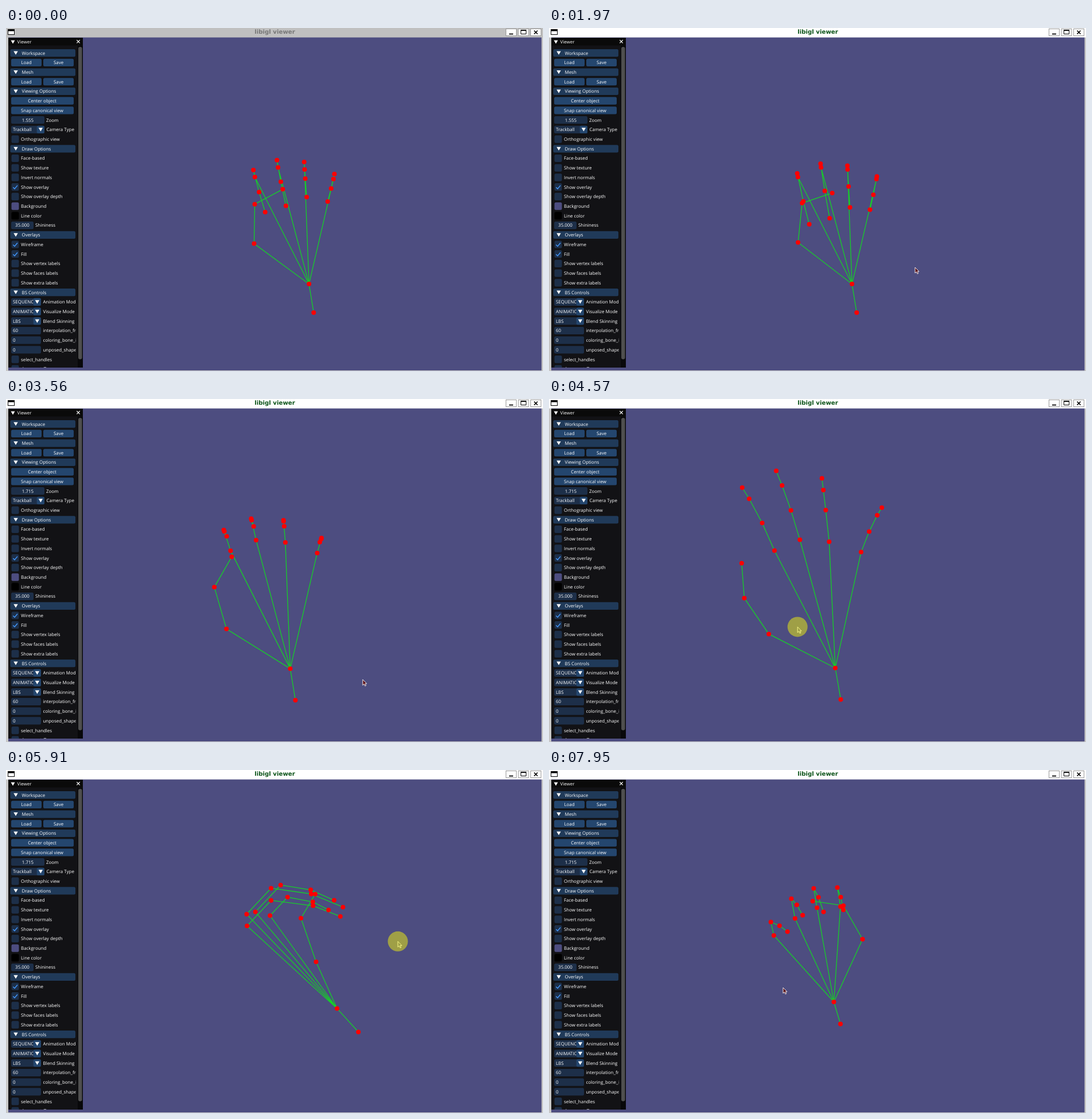
These frames come from a looping animation (936 px wide and 599 px high, 8000 ms). An HTML page:

```html
<!DOCTYPE html>
<html lang="en">
<head>
<meta charset="utf-8">
<title>Hand skeleton viewer</title>
<style>
html, body { margin: 0; width: 100%; height: 100%; overflow: hidden; background: #4d4d80; }
svg { display: block; width: 936px; height: 599px; }
text { font: 7.95px "Open Sans", "Noto Sans", sans-serif; fill: #fff; white-space: pre; text-rendering: geometricPrecision; }
#title { font: bold 10.2px "DejaVu Sans", sans-serif; }
.head { fill: #203a59; } .button { fill: #24466e; } .field { fill: #1d2f49; }
#bones { fill: none; stroke: #16cf28; stroke-width: 1.3; }
#joints { fill: #f00; }
</style>
</head>
<body>
<svg viewBox="0 0 936 599">
  <defs>
    <clipPath id="panelClip"><rect x="4" y="17" width="117.5" height="576"/></clipPath>
    <clipPath id="comboClip"><rect x="9" y="17" width="38.5" height="576"/></clipPath>
  </defs>
  <rect width="936" height="599" fill="#4d4d80"/>
  <path id="bones"/>
  <g id="joints"></g>
  <path d="M0 16H4V598H933.5V16H936V599H0Z" fill="#c8c8c8"/>
  <rect id="bar" width="936" height="16.5"/>
  <text id="title" x="468.5" y="10.3" text-anchor="middle">libigl viewer</text>
  <g stroke="#000" fill="#fff">
    <rect x="3.5" y="2.5" width="11" height="9"/><path d="M3 4H15" stroke-width="3"/>
    <g stroke="#999">
      <rect x="871.5" y="1.5" width="18" height="12"/><rect x="893" y="1.5" width="18" height="12"/><rect x="914.5" y="1.5" width="18" height="12"/>
    </g>
    <path d="M877 10.5H884" stroke-width="1.8"/>
    <path d="M897.5 4H906.5V10.5H897.5Z"/><path d="M897 4H907" stroke-width="1.8"/>
    <path d="M920.5 4.5L926.5 10.5M926.5 4.5L920.5 10.5" stroke-width="1.7"/>
  </g>
  <rect x="4" y="17" width="130" height="576" fill="#121215"/>
  <rect x="4" y="17" width="130" height="13.5" fill="#0a0a0a"/>
  <path d="M8.5 21.5H15.5L12 27.5Z" fill="#fff"/>
  <text x="19.5" y="26.7">Viewer</text>
  <path d="M123.3 21L128.7 26.4M128.7 21L123.3 26.4" stroke="#fff" stroke-width="1.1"/>
  <rect x="125" y="31" width="9" height="562" fill="#08080a"/>
  <rect x="126" y="33" width="6.5" height="545.5" rx="3" fill="#4f4f4f"/>
  <g id="panel" clip-path="url(#panelClip)"></g>
  <path id="arrow" d="M0 0V10L2.4 7.8L4 11.3L5.7 10.6L4.2 7.2H7Z" stroke="#fff" stroke-width=".9"/>
  <circle id="press" r="17.5" fill="#ff0" fill-opacity=".46"/>
</svg>
<script>
const $ = id => document.getElementById(id);
const set = (el, attrs) => { for (const k in attrs) el.setAttribute(k, attrs[k]); return el; };
const add = (parent, tag, attrs, content = '') => {
  const el = set(document.createElementNS('http://www.w3.org/2000/svg', tag), attrs);
  el.textContent = content;
  return parent.appendChild(el);
};

// Side panel: one entry per row
const panel = $('panel');
const box = (cls, x0, x1, y, extra) =>
  add(panel, 'rect', { class: cls, x: x0, y: y - 6.6, width: x1 - x0, height: 13.2, rx: 2.5, ...extra });
const label = (s, x, y, attrs) => add(panel, 'text', { x, y: y + 2.9, ...attrs }, s);
const centred = (s, x, y) => label(s, x, y, { 'text-anchor': 'middle' });
const triangle = (x, y) => add(panel, 'path', { d: `M${x - 3.7} ${y - 3}h7.4l-3.7 6.2z`, fill: '#fff' });
const widgets = {
  head(y, s) { box('head', 7.5, 121, y); triangle(17, y); label(s, 27.5, y); },
  pair(y) { [[9, 62, 'Load'], [65, 118, 'Save']].forEach(([a, b, s]) => { box('button', a, b, y); centred(s, (a + b) / 2, y); }); },
  wide(y, s) { box('button', 9, 118, y); centred(s, 63, y); },
  value(y, s, v, right) { box('field', 9, right, y); label(s, right + 3, y); return centred(v, (9 + right) / 2, y); },
  combo(y, s, v, right) {
    box('field', 9, right, y); box('button', right - 13.3, right, y); triangle(right - 6.6, y);
    label(v, 12, y, right < 65 ? { 'clip-path': 'url(#comboClip)' } : {});
    label(s, right + 3.5, y);
  },
  input(y, s, v) { box('field', 9, 61, y); label(v, 12, y); label(s, 64.5, y); },
  check(y, s, on) {
    box('field', 9.5, 22.5, y); label(s, 26, y);
    if (on) add(panel, 'path', { d: `M12.3 ${y + .5}l2.7 2.7l5-6`, fill: 'none', stroke: '#4296fa', 'stroke-width': 1.5 });
  },
  color(y, s, fill) { box('', 9.5, 22.5, y, { fill }); label(s, 26, y); }
};
const rows = [
  ['head', 'Workspace'], ['pair'], ['head', 'Mesh'], ['pair'],
  ['head', 'Viewing Options'], ['wide', 'Center object'], ['wide', 'Snap canonical view'],
  ['value', 'Zoom', '1.555', 67], ['combo', 'Camera Type', 'Trackball', 67], ['check', 'Orthographic view'],
  ['head', 'Draw Options'], ['check', 'Face-based'], ['check', 'Show texture'], ['check', 'Invert normals'],
  ['check', 'Show overlay', true], ['check', 'Show overlay depth'],
  ['color', 'Background', '#4d4d80'], ['color', 'Line color', '#000'], ['value', 'Shininess', '35.000', 48],
  ['head', 'Overlays'], ['check', 'Wireframe', true], ['check', 'Fill', true],
  ['check', 'Show vertex labels'], ['check', 'Show faces labels'], ['check', 'Show extra labels'],
  ['head', 'BS Controls'], ['combo', 'Animation Mode', 'SEQUENCE', 61], ['combo', 'Visualize Mode', 'ANIMATION', 61],
  ['combo', 'Blend Skinning', 'LBS', 61], ['input', 'interpolation_frames', '60'],
  ['input', 'coloring_bone_id', '0'], ['input', 'unposed_shape', '0'],
  ['check', 'select_handles'], ['check', 'draw_rest_T']
];
const zoomText = rows.map(([kind, ...args], i) => widgets[kind](43.6 + i * 16.72, ...args))[7];

// Hand in its own space: x right, y down, z toward the viewer, root joint at 0
const RAD = Math.PI / 180;
const wrist = [9, 55, 0];
const fingers = [
  { knuckle: [-104, -206, 0], splay: -34, bones: [64, 74, 51] },
  { knuckle: [-59.5, -224.5, 0], splay: -24, bones: [65, 71, 60] },
  { knuckle: [-8.5, -220.5, 0], splay: -9, bones: [67, 54, 45] },
  { knuckle: [47, -202, 0], splay: 30, bones: [46, 48, 33] }
];
const thumb = [
  { reach: 131, rise: 55, open: -70, swing: 19 },
  { reach: 76, rise: 27, open: -62, swing: 73 },
  { reach: 61, rise: 31, open: -57, swing: 138 }
];
const step = ([x, y, z], angle, reach, rise) =>
  [x + reach * Math.sin(angle * RAD), y - reach * Math.cos(angle * RAD), z + rise];

// Each chain starts at the root; curl runs from 0 (open) to 1 (fist)
function hand(curl) {
  const bend = [90 * curl, 150 * curl ** 1.15, 165 * curl];
  const chains = fingers.map(({ knuckle, splay, bones }) => {
    const chain = [knuckle];
    bones.forEach((len, k) => {
      const spread = splay * (1 - .75 * curl) * (1 + .2 * k), a = bend[k] * RAD;
      chain.push(step(chain[k], spread, len * Math.cos(a), len * Math.sin(a)));
    });
    return chain;
  });
  let tip = [0, 0, 0];
  chains.push(thumb.map(b => tip = step(tip, b.open + b.swing * curl, b.reach, b.rise)));
  chains.push([wrist]);
  return chains;
}
// Triangle wave between fist and open hand
function curlAt(t) {
  const beat = 2.04, d = (t - 1.9 + 2 * beat) % beat;
  return 1 - 2 * Math.min(d, beat - d) / beat;
}

// Rotation of v about a unit axis
function spin(v, n, degrees) {
  const c = Math.cos(degrees * RAD), s = Math.sin(degrees * RAD);
  const dot = v[0] * n[0] + v[1] * n[1] + v[2] * n[2];
  return v.map((x, i) => {
    const j = (i + 1) % 3, k = (i + 2) % 3;
    return x * c + (n[j] * v[k] - n[k] * v[j]) * s + n[i] * dot * (1 - c);
  });
}
const unit = v => v.map(x => x / Math.hypot(...v));
const firstAxis = unit([.34, .85, -.39]);
const secondAxis = unit([.33, .93, -.12]);

// Keys of [seconds, ...values], eased linearly in between
function at(keys, t) {
  let i = 1;
  while (i < keys.length - 1 && keys[i][0] < t) i++;
  const a = keys[i - 1], b = keys[i];
  const f = Math.min(1, Math.max(0, (t - a[0]) / (b[0] - a[0])));
  return a.slice(1).map((v, k) => v + (b[k + 1] - v) * f);
}
// Root x, y, first turn, second turn, size
const camera = [
  [2.85, 534.3, 461.3, 0, 0, 1], [3.3, 495, 471, 0, 0, 1], [4.55, 497, 470.5, 0, 0, 1],
  [5.27, 565, 445, 49, 0, 1], [6.1, 580.5, 408, 91, 0, 1], [6.57, 580.5, 408, 91, 0, 1],
  [7.42, 496.5, 405, 91, 89, .85]
];
const pointer = [
  [.45, 765, 579], [.83, 742, 433], [1.3, 638, 418], [2.63, 638, 418], [2.85, 667, 478], [3.4, 627, 502],
  [3.56, 622, 490], [4.5, 433, 398], [4.57, 433, 398], [5.27, 573, 327], [6.08, 712, 292],
  [6.45, 476, 336], [6.57, 476, 336], [7.45, 702, 320], [7.9, 408, 380]
];
const presses = [[2.85, 3.3], [4.5, 6.08], [6.5, 7.42]];
const dots = Array.from({ length: 21 }, () => add($('joints'), 'circle', { r: 4 }));

function draw(t) {
  const zoom = 1.555 * 1.05 ** ((t >= 2.42) + (t >= 2.6));
  const scale = zoom / (1.555 * 1.05 ** 2);
  const [rootX, rootY, turn1, turn2, size] = at(camera, t);
  const project = v => {
    const [x, y] = spin(spin(v, firstAxis, turn1), secondAxis, turn2);
    return [468 + (rootX + x * size - 468) * scale, 308 + (rootY + y * size - 308) * scale];
  };
  const root = project([0, 0, 0]);
  const chains = hand(curlAt(t)).map(chain => chain.map(project));
  $('bones').setAttribute('d', chains.map(c => `M${root}L${c.join('L')}`).join(''));
  [root, ...chains.flat()].forEach(([cx, cy], i) => set(dots[i], { cx, cy }));

  const active = t >= .45;
  zoomText.textContent = (Math.floor(zoom * 1000 + .9) / 1000).toFixed(3);
  $('bar').setAttribute('fill', active ? '#fff' : '#c0c0c0');
  $('title').style.fill = active ? '#0b5318' : '#777';
  const transform = `translate(${at(pointer, t)})`;
  const held = presses.some(([a, b]) => t >= a && t < b);
  set($('arrow'), { transform, visibility: active ? 'visible' : 'hidden', fill: held ? '#4d4d80' : '#5a1018' });
  set($('press'), { transform, visibility: held ? 'visible' : 'hidden' });
}
const start = performance.now();
function tick() {
  draw((performance.now() - start) % 8000 / 1000);
  requestAnimationFrame(tick);
}
tick();
</script>
</body>
</html>
```
